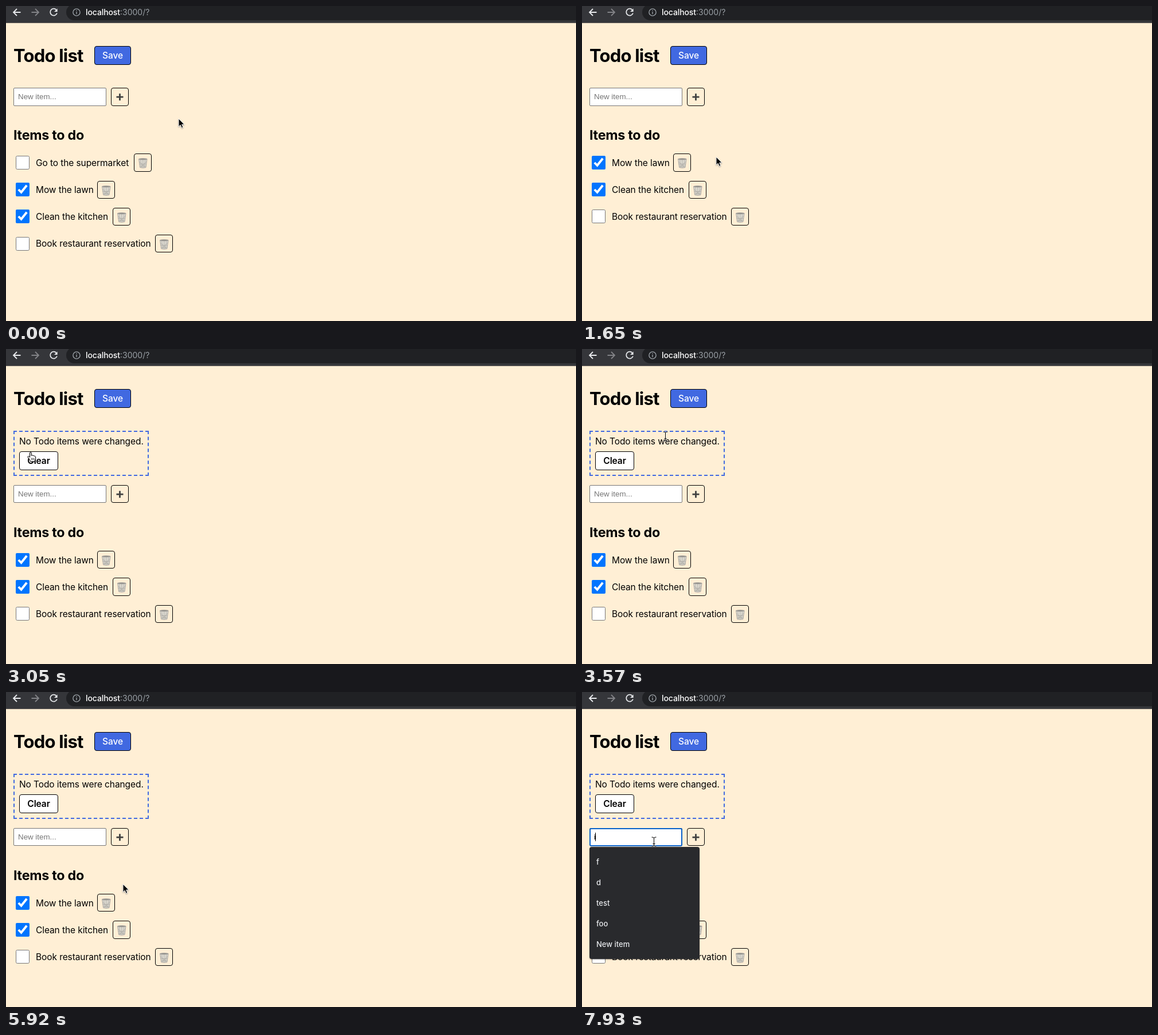
An HTML page for the animation above (7.99 s loop, 994 px wide and 551 px high).

```html
<!DOCTYPE html>
<html lang="en">
<head>
<meta charset="utf-8">
<title>Todo list</title>
<style>
  html, body { margin: 0; width: 100%; height: 100%; overflow: hidden; }
  body {
    position: relative; background: #ffefd5; color: #000;
    font: 15.5px Inter, "Open Sans", sans-serif; letter-spacing: -.09px;
  }
  body * { box-sizing: border-box; margin: 0; }
  div, h1, h2, p, svg, input { position: absolute; left: 0; top: 0; white-space: pre; }
  svg { overflow: visible; }

  .bar { width: 100%; height: 30px; background: #35363a; border-bottom: 1px solid #65625d; overflow: hidden; }
  .pill { left: 105px; top: -3px; width: 920px; height: 28px; border-radius: 14px; background: #202124; }
  .url { left: 139px; top: 1px; font-size: 14px; line-height: 20px; letter-spacing: 0; color: #9aa0a6; }
  .url b { font-weight: 500; letter-spacing: -.1px; color: #fff; }

  h1 { left: 13px; top: 67px; font-size: 31px; line-height: 40px; letter-spacing: -.8px; }
  h2 { left: 13px; top: 211px; font-size: 23.3px; line-height: 30px; letter-spacing: -.27px; }

  .btn { border: 1px solid #000; border-radius: 4px; height: 33px; line-height: 31px; text-align: center; }
  .save { left: 154px; top: 70px; width: 64px; background: #4169e1; color: #fff; font-weight: 500; }
  .note { left: 13px; top: 143px; width: 236px; height: 79px; border: 2px dashed #4169e1; }
  .note p { left: 8px; top: 7px; line-height: 20px; }
  .clear { left: 8px; top: 34px; width: 68px; background: #fff; font-weight: 600; }

  .field {
    left: 13px; top: 143.4px; width: 162px; height: 31.2px; background: #fff;
    border: 1px solid #767676; border-radius: 2px;
    font: 13.333px/29px "Liberation Sans", Arial, sans-serif; letter-spacing: 0;
  }
  .field div { left: 7px; }
  .hint { color: #757575; }
  .field .ring { inset: -1px; border: 2px solid #0a62c9; border-radius: 3px; }
  .field .caret { top: 7px; width: 1px; height: 15px; background: #000; }
  .icon { width: 31px; height: 31.2px; }
  .add { left: 183px; top: 143.4px; }

  .list { top: 258.4px; }
  .row { height: 31.2px; line-height: 31.2px; }
  .row p { left: 52px; top: .4px; }
  .row input { left: 17px; top: 3.6px; width: 24px; height: 24px; pointer-events: none; }

  .menu {
    left: 13px; top: 271px; width: 192px; height: 196px; border-radius: 4px; background: #292a2d;
    box-shadow: 0 1px 2px rgba(0, 0, 0, .35);
    color: #e8eaed; font-size: 13px; font-weight: 500; letter-spacing: 0;
  }
  .menu p { left: 12px; line-height: 36px; }
  .cursor svg { width: 1px; height: 1px; }
  .shade { filter: drop-shadow(0 1px 1px rgba(0, 0, 0, .35)); }
</style>
</head>
<body>
  <div class="bar">
    <div class="pill"></div>
    <svg width="140" height="29" fill="none" stroke="#e8eaed" stroke-width="1.8">
      <path d="M25.5 11H13.5M19 5l-6 6 6 6"/>
      <path d="M44.5 11h12M51 5l6 6-6 6" stroke="#828387"/>
      <path d="M87.6 6.6A6 6 0 1 0 88.9 12.5"/>
      <path d="M89.6 4.4V10h-5.6z" fill="#e8eaed" stroke="none"/>
      <g stroke="#9aa0a6" stroke-width="1.4"><circle cx="123" cy="11" r="6.1"/><path d="M123 10v4.2M123 7.2v1.5"/></g>
    </svg>
    <div class="url"><b>localhost</b>:3000/?</div>
  </div>

  <h1>Todo list</h1>
  <div class="btn save">Save</div>

  <div class="note">
    <p>No Todo items were changed.</p>
    <div class="btn clear">Clear</div>
  </div>

  <div class="below">
    <div class="field">
      <div class="hint">New item...</div>
      <div class="typed">i</div>
      <div class="ring"></div>
      <div class="caret"></div>
    </div>
    <div class="btn icon add">
      <svg stroke="#414141" stroke-width="2.8"><path d="M8.5 15.2h12M14.5 9.2v12"/></svg>
    </div>
    <h2>Items to do</h2>
    <div class="list"></div>
  </div>

  <div class="menu"></div>

  <div class="cursor">
    <svg class="arrow shade"><path d="M0 0V14.2L3.2 11.2 5.5 16.4 7.9 15.3 5.7 10.2H10Z" stroke="#fff"/></svg>
    <svg class="hand shade" fill="#fff" stroke="#000" stroke-linejoin="round">
      <path d="M-1.4 8.5V.9a1.3 1.3 0 0 1 2.6 0V5.6C1.4 4.4 3.6 4.4 3.8 6 4.1 5 6.2 5.1 6.3 6.7 6.7 5.9 8.5 6.1 8.5 7.8V10.5C8.5 12.5 7.2 13.5 7.2 15.8H-.3C-.5 14-2 12.5-2.8 11L-4.8 8.1C-5.4 6.9-4 6-3 6.9Z"/>
      <path d="M1.6 9.6v3.6M3.7 9.6v3.6M5.8 9.6v3.6" stroke-width=".8"/>
    </svg>
    <svg class="beam" fill="none">
      <defs><path id="bar" d="M-3.5-8H-2Q.5-8 .5-6V6Q.5 8-2 8H-3.5M4.5-8H3Q.5-8 .5-6M.5 6Q.5 8 3 8H4.5M-1.5 3.5H2.5"/></defs>
      <use href="#bar" stroke="#fff" stroke-opacity=".6" stroke-width="2.4"/>
      <use href="#bar" stroke="#000"/>
    </svg>
  </div>

<script>
  const LOOP = 7990, TICK = 60, PITCH = 47.2, SHIFT = 94.8;
  const DELETED = 1230, SAVED = 2360, HOVER = 6640, FOCUS = 7040, BLINK = 7520, TYPED = 7930;
  const $ = s => document.querySelector(s);

  const BIN = `<svg fill="none">
    <path d="M7.6 8.8H22L19.9 23.6Q14.8 25 9.7 23.6Z" fill="#dcd9d0" stroke="#a3a19c" stroke-width=".9"/>
    <path d="M10.5 10 12.5 23.5M14.8 10V24M19 10 17 23.5M8.5 13.5 18.8 23M21 13.5 10.8 23M8.6 17.5H21M9.2 21H20.4" stroke="#a09e99" stroke-width=".6"/>
    <ellipse cx="14.8" cy="8.8" rx="7.4" ry="1.2" fill="#8f8d88" stroke="#aaa8a2" stroke-width=".8"/></svg>`;

  const items = [
    ['Go to the supermarket', 223, ''],
    ['Mow the lawn', 159, 'checked'],
    ['Clean the kitchen', 186, 'checked'],
    ['Book restaurant reservation', 260, '']
  ];
  $('.list').innerHTML = items.map(([text, x, state], i) => `
    <div class="row" style="top:${i * PITCH}px">
      <input type="checkbox" tabindex="-1" ${state}>
      <p>${text}</p>
      <div class="btn icon" style="left:${x}px">${BIN}</div>
    </div>`).join('');

  $('.menu').innerHTML = ['f', 'd', 'test', 'foo', 'New item']
    .map((s, i) => `<p style="top:${8 + 36 * i}px">${s}</p>`).join('');

  // Every change is a hard step: frames are [ms, style].
  const run = (sel, frames) => $(sel).animate(
    frames.map(([ms, style]) => ({ offset: ms / LOOP, easing: 'step-end', ...style })),
    { duration: LOOP, iterations: Infinity });

  // Visibility alternates at each listed time.
  const toggle = (sel, visible, ...times) => run(sel,
    [0, ...times].map((ms, i) => [ms, { opacity: visible === (i % 2 === 0) ? 1 : 0 }]));

  const swap = (sel, ms, prop, from, to) => run(sel, [[0, { [prop]: from }], [ms, { [prop]: to }]]);

  toggle('.row', true, DELETED);
  swap('.list', DELETED, 'top', '258.4px', 258.4 - PITCH + 'px');
  toggle('.note', false, SAVED);
  swap('.below', SAVED, 'top', '0px', SHIFT + 'px');
  swap('.field', HOVER, 'borderColor', '#767676', '#4f4f4f');
  toggle('.ring', false, FOCUS);
  toggle('.menu', false, FOCUS + TICK);
  toggle('.caret', false, FOCUS, BLINK, TYPED);
  swap('.caret', TYPED, 'left', '7px', '9px');
  toggle('.hint', true, TYPED);
  toggle('.typed', false, TYPED);

  // The pointer's shape follows from what lies under it.
  const shapeAt = (ms, x, y) => {
    const over = (l, t, w, h) => x >= l && x < l + w && y >= t && y < t + h;
    const saved = ms >= SAVED, top = saved ? 143 + SHIFT : 143;
    if (over(154, 70, 64, 33) || over(183, top, 31, 31)) return 'hand';
    if (saved ? over(23, 179, 68, 33) : ms < DELETED && over(223, 258, 31, 32)) return 'hand';
    if (over(13, top, 162, 31) || saved && over(23, 150, 215, 24)) return 'beam';
    return 'arrow';
  };

  // Pointer glides: start, end, target x, y and sideways bend.
  const glides = [
    { from: 350, to: 1110, x: 234, y: 265 },
    { from: 1650, to: 2190, x: 174, y: 96 },
    { from: 2710, to: 3220, x: 26, y: 192 },
    { from: 3280, to: 3460, x: 48, y: 216 },
    { from: 3510, to: 3570, x: 145, y: 153 },
    { from: 3630, to: 3980, x: 141, y: 161, bend: 24 },
    { from: 4570, to: 4750, x: 416, y: 257 },
    { from: 4990, to: 5050, x: 459, y: 270 },
    { from: 5110, to: 5220, x: 276, y: 191 },
    { from: 5400, to: 5520, x: 215, y: 198 },
    { from: 5810, to: 5920, x: 204, y: 336 },
    { from: 6160, to: 6740, x: 125, y: 262 }
  ];
  const ease = p => p ** 2.4 / (p ** 2.4 + (1 - p) ** 2.4);

  let at = { x: 301, y: 197 };
  const stops = [[0, at.x, at.y]];
  for (const { from, to, x, y, bend = 0 } of glides) {
    const gaps = Math.round((to - from) / TICK), dx = x - at.x, dy = y - at.y;
    const side = bend / Math.hypot(dx, dy);
    for (let i = 0; i <= gaps; i++) {
      const p = ease((i + 1) / (gaps + 1)), bulge = side * Math.sin(Math.PI * p);
      stops.push([
        from + (to - from) * i / gaps,
        Math.round(at.x + dx * p + dy * bulge),
        Math.round(at.y + dy * p - dx * bulge)
      ]);
    }
    at = { x, y };
  }

  run('.cursor', stops.map(([ms, x, y]) => [ms, { transform: `translate(${x}px, ${y}px)` }]));
  for (const shape of ['arrow', 'hand', 'beam'])
    run('.' + shape, stops.map(([ms, x, y]) => [ms, { opacity: shapeAt(ms, x, y) === shape ? 1 : 0 }]));
</script>
</body>
</html>
```
